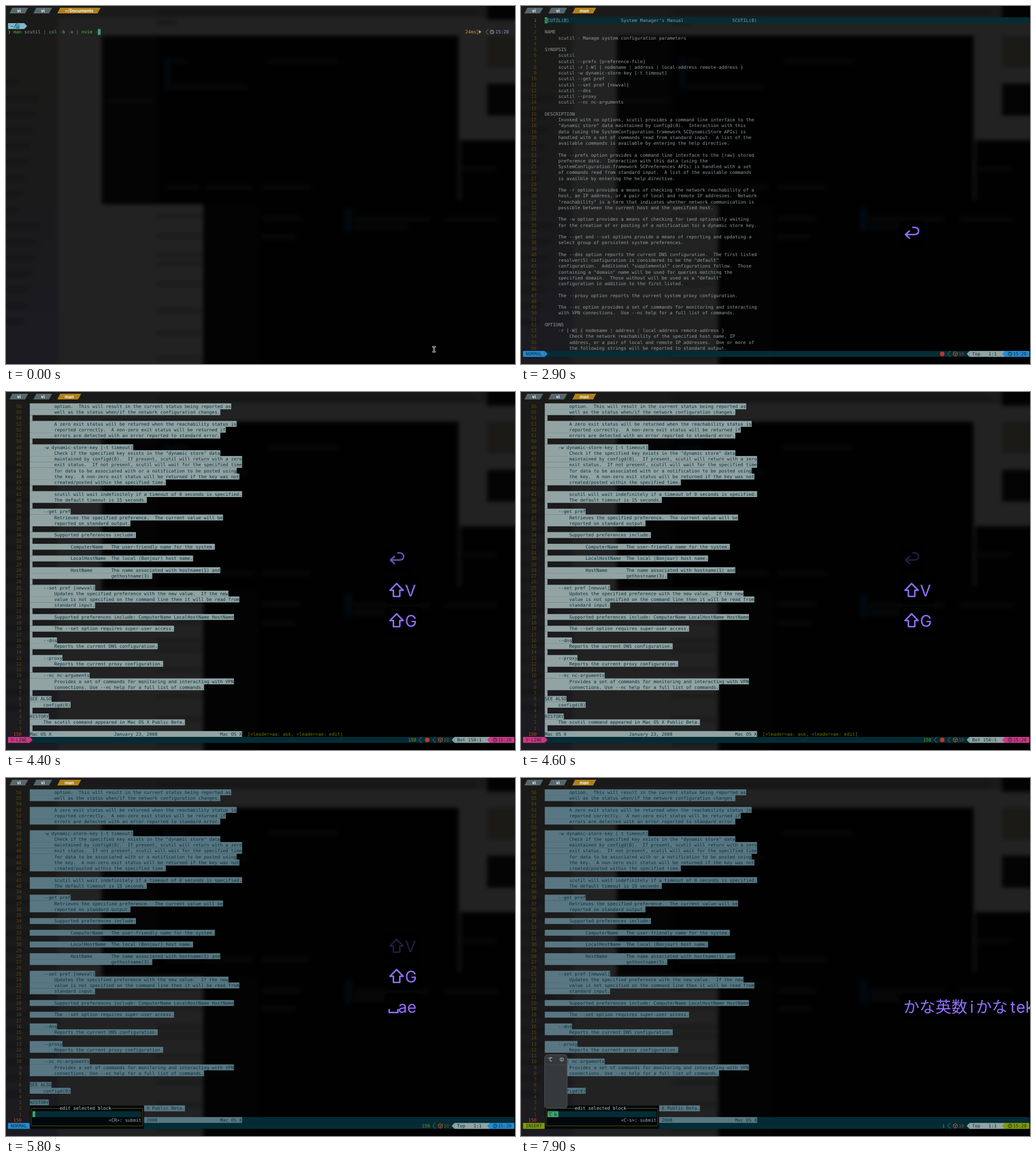
An HTML page for the animation above (8 s loop, 893x627 px).

```html
<!DOCTYPE html>
<html lang="en">
<head>
<meta charset="utf-8">
<title>Terminal session</title>
<style>
html, body { margin: 0; width: 100%; height: 100%; overflow: hidden; background: #020203; }
svg { display: block; width: 893px; height: 627px; }
text { white-space: pre; text-rendering: geometricPrecision; }
.term { font: 7.933px "DejaVu Sans Mono", monospace; }
.tab { font: bold 8.2px Roboto, sans-serif; fill: #f2f2f2; }
.key { font: 28px Inter, "Noto Sans CJK JP", "Noto Sans CJK", sans-serif; fill: #9470ff; }
.cjk { font: 9px "Noto Sans CJK JP", "Noto Sans CJK", sans-serif; }
</style>
</head>
<body>
<svg id="stage" viewBox="0 0 893 627" xmlns="http://www.w3.org/2000/svg"></svg>
<script>
const LOOP = 8000, CW = 4.776, RH = 10.25, X0 = 3.5, Y0 = 25;
const C = {
  fg: '#909c9c', num: '#60480f', cur: '#d8432a', teal: '#042c36', ink: '#06303b',
  light: '#91a3a3', slate: '#597782', blue: '#268bd2', pink: '#d33682',
  green: '#859900', block: '#3fa66b', orange: '#b5541c', prompt: '#3fc22f'
};
const cx = col => X0 + col * CW;
const cy = row => Y0 + row * RH;
const esc = s => s.replace(/&/g, '&amp;').replace(/</g, '&lt;');
const rect = (x, y, w, h, fill, more = '') =>
  `<rect x="${x}" y="${y}" width="${w}" height="${h}" fill="${fill}" ${more}/>`;
const poly = (pts, fill) => `<polygon points="${pts}" fill="${fill}"/>`;
const line = (d, stroke, w = 1) =>
  `<path d="${d}" fill="none" stroke="${stroke}" stroke-width="${w}" stroke-linejoin="round" stroke-linecap="round"/>`;
const type = (col, row, s, fill = C.fg, more = '') =>
  `<text class="term" x="${cx(col)}" y="${cy(row) + 2.9}" fill="${fill}" ${more}>${esc(s)}</text>`;
const cells = (col, row, n, fill) => rect(cx(col), cy(row) - RH / 2, n * CW, RH + .1, fill);
const clock = (x, y, c) =>
  `<circle cx="${x}" cy="${y}" r="3.3" fill="none" stroke="${c}"/>` + line(`M${x} ${y - 2}v2l1.4 .9`, c, .8);
const chevron = (col, row, c) =>
  line(`M${cx(col) + 4.6} ${cy(row) - 4.8}l-4.4 4.8l4.4 4.8`, c, .8);

let out = '';
const layer = (from, to, body) => { out += `<g data-from="${from}" data-to="${to}">${body}</g>`; };

// Blurred desktop behind the translucent terminal
function backdrop() {
  let s = `<defs><filter id="soft" x="-5%" y="-5%" width="110%" height="110%" color-interpolation-filters="sRGB">
    <feGaussianBlur stdDeviation="3.5"/></filter>
    <linearGradient id="side" x1="0" y1="0" x2="0" y2="1"><stop offset="0" stop-color="#1a1a17"/>
    <stop offset=".5" stop-color="#1a1a1b"/><stop offset="1" stop-color="#1b1b22"/></linearGradient></defs>`;
  s += rect(0, 0, 893, 627, '#222223') + '<g filter="url(#soft)">';
  s += rect(-20, -20, 950, 700, '#222223');
  s += rect(-20, -20, 111, 690, 'url(#side)') + rect(92, -20, 840, 40, '#1a1a1b');
  for (let i = 0; i < 16; i++) s += rect(-9, 129 + i * 28, 30 + (i * 37) % 42, 8, '#151516');
  for (const y of [368, 403, 436, 452, 487, 533, 573, 616]) s += rect(264, y - 4, 78, 8, '#1b1b1c');
  s += rect(264, 7, 560, 9, '#151516') + rect(264, 24, 36, 9, '#191919');
  s += rect(168, 52, 626, 295, '#010102') + rect(346, 340, 570, 350, '#010102') + rect(797, 235, 130, 460, '#010102');
  s += rect(168, 52, 97, 290, '#040404') + rect(346, 348, 97, 340, '#030303');
  s += rect(844, -20, 80, 44, '#030303') + rect(844, 52, 80, 56, '#1b1a17') + rect(844, 136, 80, 56, '#040404');
  s += rect(279, 92, 10, 55, '#010a12') + rect(595, 354, 12, 40, '#010a12');
  for (const [x, y, w] of [[292, 97, 25], [292, 141, 132], [460, 97, 122], [176, 166, 82], [280, 318, 60],
    [350, 318, 85], [450, 318, 85], [450, 372, 68], [450, 404, 58], [611, 374, 132], [611, 387, 95], [770, 374, 92], [800, 285, 60]])
    s += rect(x, y - 4, w, 8, '#070809');
  return s + '</g>';
}

const tab = (x, w) => `${x + 5},3 ${x + w},3 ${x + w - 5.5},13 ${x},13`;
const label = (x, s) => `<text class="tab" x="${x}" y="10.9">${s}</text>`;

// Highlighted lines: blanks get one cell only when "blank" is set
const marks = (lines, fill, blank) => lines.map((s, r) => {
  const n = s.length || blank;
  return n ? cells(8, r, n, fill) : '';
}).join('');
const page = (lines, fill) => lines.map((s, r) => s && type(8, r, s, fill)).join('');
function numbers(at, abs) {
  let s = '';
  for (let r = 0; r < 57; r++) {
    const n = String(r === at ? abs : Math.abs(r - at));
    s += type(5 - n.length, r, n, r === at ? C.cur : C.num, r === at ? 'font-weight="bold"' : '');
  }
  return s;
}
const hint = row => type(88, row, '[<leader>aa: ask, <leader>ae: edit]', '#6b7a08', 'font-style="italic"');

function status(from, to, mode, color, pos, count, dot) {
  const y = cy(57), t = y - RH / 2, b = y + RH / 2;
  const tip = (x, d) => `${x},${t} ${x + d},${y} ${x},${b}`;
  let s = cells(0, 57, 186, C.teal) + cells(0, 57, 8, color) + poly(tip(cx(8), CW), color);
  s += type(1, 57, mode, C.ink);
  if (count) s += type((dot ? 150 : 155) - count.length, 57, count, C.green);
  if (dot) {
    if (count) s += chevron(151, 57, '#70868a');
    s += `<circle cx="739" cy="${y}" r="4" fill="#b83a24"/>`;
  }
  if (dot || count) s += chevron(156, 57, '#70868a');
  s += line(`M762 ${y - 4}l3.6 2v4l-3.6 2l-3.6-2v-4zM758.4 ${y - 2}l3.6 2l3.6-2M762 ${y}v4`, C.orange);
  s += type(160, 57, '10', '#8a4a2a');
  s += cells(164, 57, 13, C.light) + poly(tip(cx(164), -CW), C.light) + type(165, 57, pos, C.ink);
  s += cells(177, 57, 9, color) + poly(tip(cx(177), -CW), color);
  s += clock(858, y, C.ink) + type(180, 57, '15:20', C.ink);
  layer(from, to, s);
}

const head = 'SCUTIL(8)'.padEnd(28) + "System Manager's Manual".padEnd(41) + 'SCUTIL(8)';
const foot = 'Mac OS X'.padEnd(31) + 'January 23, 2008'.padEnd(39) + 'Mac OS X';
const top57 = [head, ...`
NAME
     scutil - Manage system configuration parameters

SYNOPSIS
     scutil
     scutil --prefs [preference-file]
     scutil -r [-W] { nodename ¦ address ¦ local-address remote-address }
     scutil -w dynamic-store-key [-t timeout]
     scutil --get pref
     scutil --set pref [newval]
     scutil --dns
     scutil --proxy
     scutil --nc nc-arguments

DESCRIPTION
     Invoked with no options, scutil provides a command line interface to the
     "dynamic store" data maintained by configd(8).  Interaction with this
     data (using the SystemConfiguration.framework SCDynamicStore APIs) is
     handled with a set of commands read from standard input.  A list of the
     available commands is available by entering the help directive.

     The --prefs option provides a command line interface to the [raw] stored
     preference data.  Interaction with this data (using the
     SystemConfiguration.framework SCPreferences APIs) is handled with a set
     of commands read from standard input.  A list of the available commands
     is availble by entering the help directive.

     The -r option provides a means of checking the network reachability of a
     host, an IP address, or a pair of local and remote IP addresses.  Network
     "reachability" is a term that indicates whether network communication is
     possible between the current host and the specified host.

     The -w option provides a means of checking for (and optionally waiting
     for the creation of or posting of a notification to) a dynamic store key.

     The --get and --set options provide a means of reporting and updating a
     select group of persistent system preferences.

     The --dns option reports the current DNS configuration.  The first listed
     resolver(5) configuration is considered to be the "default"
     configuration.  Additional "supplemental" configurations follow.  Those
     containing a "domain" name will be used for queries matching the
     specified domain.  Those without will be used as a "default"
     configuration in addition to the first listed.

     The --proxy option reports the current system proxy configuration.

     The --nc option provides a set of commands for monitoring and interacting
     with VPN connections.  Use --nc help for a full list of commands.

OPTIONS
     -r [-W] { nodename ¦ address ¦ local-address remote-address }
         Check the network reachability of the specified host name, IP
         address, or a pair of local and remote IP addresses.  One or more of
         the following strings will be reported to standard output.`.split('\n')];

const end57 = [...`         option.  This will result in the current status being reported as
         well as the status when/if the network configuration changes.

         A zero exit status will be returned when the reachability status is
         reported correctly.  A non-zero exit status will be returned if
         errors are detected with an error reported to standard error.

     -w dynamic-store-key [-t timeout]
         Check if the specified key exists in the "dynamic store" data
         maintained by configd(8).  If present, scutil will return with a zero
         exit status.  If not present, scutil will wait for the specified time
         for data to be associated with or a notification to be posted using
         the key.  A non-zero exit status will be returned if the key was not
         created/posted within the specified time.

         scutil will wait indefinitely if a timeout of 0 seconds is specified.
         The default timeout is 15 seconds.

     --get pref
         Retrieves the specified preference.  The current value will be
         reported on standard output.

         Supported preferences include:

               ComputerName   The user-friendly name for the system.

               LocalHostName  The local (Bonjour) host name.

               HostName       The name associated with hostname(1) and
                              gethostname(3).

     --set pref [newval]
         Updates the specified preference with the new value.  If the new
         value is not specified on the command line then it will be read from
         standard input.

         Supported preferences include: ComputerName LocalHostName HostName

         The --set option requires super-user access.

     --dns
         Reports the current DNS configuration.

     --proxy
         Reports the current proxy configuration.

     --nc nc-arguments
         Provides a set of commands for monitoring and interacting with VPN
         connections. Use --nc help for a full list of commands.

SEE ALSO
     configd(8)

HISTORY
     The scutil command appeared in Mac OS X Public Beta.
`.split('\n'), foot];

// Key moments
const T = { enter: 2500, open: 2700, visual: 3700, last: 4400, edit: 5500, insert: 7100, kana: 7700 };

out += backdrop();
out += poly(tab(6, 33), '#56676d') + poly(tab(48, 33), '#56676d') + label(19.5, 'vi') + label(61.5, 'vi');
layer(0, T.open, poly(tab(90, 76), '#b08119') + label(103, '~/Documents'));
layer(T.open, LOOP, poly(tab(90, 42), '#b08119') + label(103, 'man'));

// Shell prompt
let shell = rect(3.5, 30, 28.5, 10.3, '#7db9d0') + poly('32,30 37.2,35.2 32,40.3', '#7db9d0') + type(1, 1, '~/', C.ink);
shell += line('M18 31.5h3l2 2v5h-5zM19.5 34.8h2M19.5 36.7h2', C.ink, .8);
for (const [col, s, c] of [[0, '❯', C.prompt], [2, 'man', C.prompt], [6, 'scutil ¦', C.fg], [15, 'col', C.prompt],
  [19, '-b -x ¦', C.fg], [27, 'nvim', C.prompt], [32, '-', C.fg], [168, '24ms', '#dd9a2c'], [179, '15:20', '#8f96d6']])
  shell += type(col, 2, s, c);
const spark = (x, y, r) => {
  const k = r / 5;
  return poly(`${x},${y - r} ${x + k},${y - k} ${x + r},${y} ${x + k},${y + k} ${x},${y + r} ${x - k},${y + k} ${x - r},${y} ${x - k},${y - k}`, '#f4c044');
};
shell += spark(831, 45.3, 4) + spark(827, 42.6, 1.6) + spark(827, 48.4, 1.6);
shell += chevron(175.5, 2, '#8c9699') + clock(852.5, cy(2), '#a5adb0');
for (const [c, w] of [['#eee', 2.3], ['#111', .8]])
  shell += line('M748.8 597h4.2M750.9 597v8.6M748.8 605.6h4.2', c, w);
layer(0, T.open, shell);
for (const [a, b] of [[0, 100], [600, 1100], [1600, T.enter]]) layer(a, b, cells(33, 2, 1, C.block));

// First page
layer(T.open, T.visual, cells(8, 0, 178, C.teal) + type(8, 0, head));
layer(T.visual, T.last, cells(8, 0, 78, C.light) + type(8, 0, head, C.ink) + hint(0));
layer(T.open, T.last, numbers(0, 1) + page(['', ...top57.slice(1)], C.fg) + cells(8, 0, 1, C.block) + type(8, 0, 'S', C.ink));

// Last page, selected
layer(T.last, T.edit, marks(end57, C.light, 1) + hint(56));
layer(T.edit, LOOP, cells(8, 56, 178, C.teal) + marks(end57, C.slate, 0));
layer(T.last, LOOP, numbers(56, 150) + page(end57, C.ink));

status(T.open, T.visual + 150, 'NORMAL', C.blue, 'Top   1:1', '', true);
status(T.visual + 150, T.last, 'V-LINE', C.pink, 'Top   1:1', '1', true);
status(T.last, T.edit, 'V-LINE', C.pink, 'Bot 150:1', '150', true);
status(T.edit, T.insert, 'NORMAL', C.blue, 'Top   1:1', '150', false);
status(T.insert, LOOP, 'INSERT', C.green, 'Top   1:1', 'i', false);

// Edit prompt
layer(T.edit, LOOP, rect(cx(8), 573.3, 42 * CW, 41.2, '#01080b') +
  rect(44.1, cy(54), 195.8, 3 * RH, 'none', 'rx="2" stroke="#6e4d0a" stroke-width=".9"') +
  cells(19, 54, 19, '#01080b') + type(19, 54, 'edit selected block', '#c3cbcb') + cells(9, 55, 40, C.teal));
layer(T.edit, T.insert, type(37, 56, '<CR>: submit', '#a3adad'));
layer(T.insert, LOOP, type(36, 56, '<C-s>: submit', '#a3adad'));
layer(T.edit, T.kana, cells(9, 55, 1, C.block));

// Input method
const cjk = (x, y, s, fill) => `<text class="cjk" x="${x}" y="${y}" fill="${fill}">${s}</text>`;
layer(T.kana, LOOP, rect(41.5, 484.5, 39.5, 94, '#36393c', 'rx="5" stroke="#55585a" stroke-width=".8"') +
  line('M43 502.5h37', '#4b4f52', .7) + cjk(47, 496.3, 'て', '#fff') +
  '<circle cx="71.5" cy="493" r="3" fill="none" stroke="#d5d7d8" stroke-width=".8"/>' +
  line('M71.5 492.7v1.8M71.5 491.3v.1', '#d5d7d8', .8) +
  cells(9, 55, 2, C.block) + cjk(46.7, 592, 'て', C.ink));
layer(T.kana + 100, LOOP, cells(11, 55, 2, C.block) + cjk(56.3, 592, 'ｋ', C.ink));

// Pressed keys: each part is [time, x, glyph, right edge]
const glyphs = {
  ret: 'M681.5 -17l-7 6.3l7 6.3M675 -10.7h15q7.5 0 7.5 -6.3t-7.5 -6.3h-2.5',
  shift: 'M685.3 -22.5l-11.6 11.8h6v10.7h11.2v-10.7h6z',
  space: 'M672.3 -5.5v5.3h15.2v-5.3'
};
const keys = [
  [[T.enter, 672, 'ret', 702]],
  [[T.visual, 672, 'shift', 698], [T.visual, 700, 'V', 720]],
  [[T.last - 50, 672, 'shift', 698], [T.last - 50, 700, 'G', 722]],
  [[5200, 672, 'space', 689], [5300, 688, 'a', 704], [5400, 703.7, 'e', 720]],
  [[6400, 671, 'かな', 727], [6600, 727, '英数', 783], [6900, 787.5, 'i', 794], [7400, 798, 'かな', 854],
    [7550, 858.5, 't', 868], [7650, 868.5, 'e', 885], [7800, 884.8, 'k', 901]]
];
out += keys.map(parts => '<g class="row"><rect x="664" y="-35" height="49" rx="9" fill="#000" fill-opacity=".85"/>' +
  parts.map(([, x, s]) => '<g>' + (glyphs[s] ? line(glyphs[s], '#9470ff', 2.6) : `<text class="key" x="${x}" y="0">${s}</text>`) + '</g>').join('') +
  '</g>').join('');

const stage = document.getElementById('stage');
stage.innerHTML = out;
const layers = [...stage.querySelectorAll('[data-from]')];
const rows = [...stage.querySelectorAll('.row')];
const show = (el, on) => { el.style.display = on ? '' : 'none'; };

function draw(t) {
  for (const el of layers) show(el, t >= +el.dataset.from && t < +el.dataset.to);
  rows.forEach((row, i) => {
    const parts = keys[i], typed = parts.filter(p => p[0] <= t);
    const last = typed[typed.length - 1];
    const alpha = last ? Math.min(1, Math.max(0, (2200 - t + last[0]) / 400)) : 0;
    show(row, alpha > 0);
    if (!alpha) return;
    const above = keys.filter((k, j) => j > i && k[0][0] <= t).length;
    row.setAttribute('transform', `translate(0 ${411 - 53 * above})`);
    row.setAttribute('opacity', alpha);
    row.firstChild.setAttribute('width', last[3] + 8 - 664);
    parts.forEach((p, j) => show(row.children[j + 1], p[0] <= t));
  });
}

const start = performance.now();
function tick() {
  draw((performance.now() - start) % LOOP);
  requestAnimationFrame(tick);
}
tick();
</script>
</body>
</html>
```
